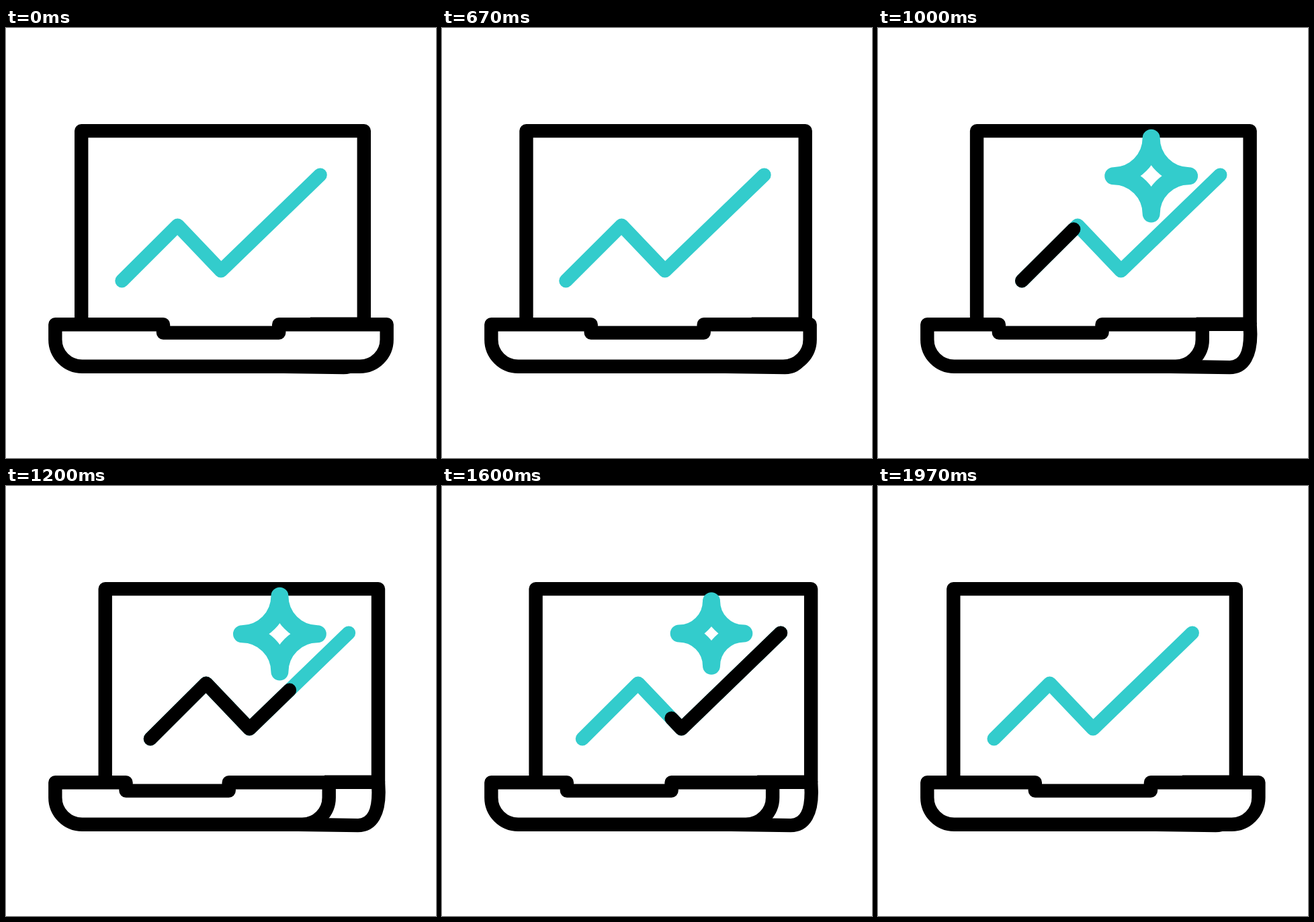
Write an HTML page with a canvas that moves like this. It is 640 px wide and 640 px high and loops after 2.5 s.

```html
<!DOCTYPE html>
<html lang="en">
<head>
<meta charset="utf-8">
<title>Laptop chart</title>
<style>
  html, body { margin: 0; width: 100%; height: 100%; overflow: hidden; background: #fff; }
  canvas { display: block; width: 100vmin; height: 100vmin; }
</style>
</head>
<body>
<canvas id="stage" width="640" height="640"></canvas>
<script>
const LOOP = 2500;
const TEAL = '#33cccc';
const BLACK = '#000';
const STROKE = 20.4;
const ctx = document.getElementById('stage').getContext('2d');

const CHART = [[172.5, 376.3], [255.4, 293.6], [320, 361.4], [467.6, 218.6]];
const CHART_LEN = CHART.slice(1).reduce(
  (sum, [x, y], i) => sum + Math.hypot(x - CHART[i][0], y - CHART[i][1]), 0);

const clamp = v => Math.min(1, Math.max(0, v));
const ramp = (t, from, to) => clamp((t - from) / (to - from));
const sine = (t, from, to) => (1 - Math.cos(Math.PI * ramp(t, from, to))) / 2;

// Cubic Bezier easing, solved by bisection
function bezier(x, x1, y1, x2, y2) {
  const at = (s, a, b) => 3 * (1 - s) * (1 - s) * s * a + 3 * (1 - s) * s * s * b + s * s * s;
  let lo = 0, hi = 1;
  for (let i = 0; i < 24; i++) {
    const mid = (lo + hi) / 2;
    if (at(mid, x1, x2) < x) lo = mid; else hi = mid;
  }
  return at(lo, y1, y2);
}

function stroke(color, width = STROKE) {
  ctx.strokeStyle = color;
  ctx.lineWidth = width;
  ctx.stroke();
}

function polyline(points) {
  ctx.beginPath();
  points.forEach(([x, y]) => ctx.lineTo(x, y));
}

function drawBack(dx) {
  ctx.save();
  ctx.translate(dx, 0);
  ctx.beginPath();
  ctx.moveTo(414, 503.8);
  ctx.lineTo(502.7, 505.1);
  ctx.bezierCurveTo(524, 505.1, 533.4, 485, 533.4, 456);
  ctx.lineTo(532.8, 440.7);
  ctx.lineTo(452.8, 440.7);
  stroke(BLACK);
  ctx.restore();
}

function drawScreen(k) {
  const left = 112.2 + 35.5 * k, right = 532.8 + 21.2 * k;
  polyline([[left, 441], [left, 153.1], [right, 153.1], [right, 441]]);
  stroke(BLACK);
}

function drawBase(k) {
  const left = 73.3, right = 566.7 - 86 * k;
  const notchL = 234 - 55.5 * k, notchR = 406.2 - 74.5 * k;
  const top = 441.3, dip = 453.6, bottom = 503.7, r = 40;
  polyline([[left, top], [notchL, top], [notchL, dip], [notchR, dip], [notchR, top], [right, top]]);
  ctx.arcTo(right, bottom, right - r, bottom, r);
  ctx.arcTo(left, bottom, left, bottom - r, r);
  ctx.closePath();
  ctx.fillStyle = '#fff';
  ctx.fill();
  stroke(BLACK);
}

function drawChart(from, to) {
  polyline(CHART);
  ctx.lineCap = 'round';
  stroke(TEAL);
  if (to > from) {
    ctx.setLineDash([(to - from) * CHART_LEN, 2 * CHART_LEN]);
    ctx.lineDashOffset = -from * CHART_LEN;
    stroke(BLACK);
    ctx.setLineDash([]);
  }
  ctx.lineCap = 'butt';
}

function drawStar(size, alpha) {
  if (alpha <= 0) return;
  const r = 56.4 * size + 0.01;
  ctx.save();
  ctx.globalAlpha = alpha;
  ctx.translate(361.9 + 3.1 * size, 215.3 + 4.9 * size);
  ctx.beginPath();
  ctx.moveTo(0, -r);
  ctx.arc(r, -r, r, Math.PI, Math.PI / 2, true);
  ctx.arc(r, r, r, -Math.PI / 2, -Math.PI, true);
  ctx.arc(-r, r, r, 0, -Math.PI / 2, true);
  ctx.arc(-r, -r, r, Math.PI / 2, 0, true);
  ctx.closePath();
  stroke(TEAL, 26);
  ctx.restore();
}

function draw(t) {
  const screen = bezier(ramp(t, 460, 1060), 0.3, 0.1, 0.6, 1) - sine(t, 1420, 1990);
  const base = sine(t, 496, 1057) - sine(t, 1480, 1990);
  const slide = sine(t, 462, 1050) - sine(t, 1475, 1990);
  const star = sine(t, 680, 990) - sine(t, 1480, 1970);
  const alpha = ramp(t, 680, 880) - ramp(t, 1720, 1920);

  ctx.fillStyle = '#fff';
  ctx.fillRect(0, 0, 640, 640);
  ctx.lineJoin = 'round';
  drawBack(21.2 * screen);
  drawScreen(screen);
  drawBase(base);
  ctx.save();
  ctx.translate(42.4 * slide, 0);
  drawChart(sine(t, 1325, 1911), sine(t, 768, 1450));
  drawStar(star, alpha);
  ctx.restore();
}

function tick() {
  draw(performance.now() % LOOP);
  requestAnimationFrame(tick);
}
tick();
</script>
</body>
</html>
```
